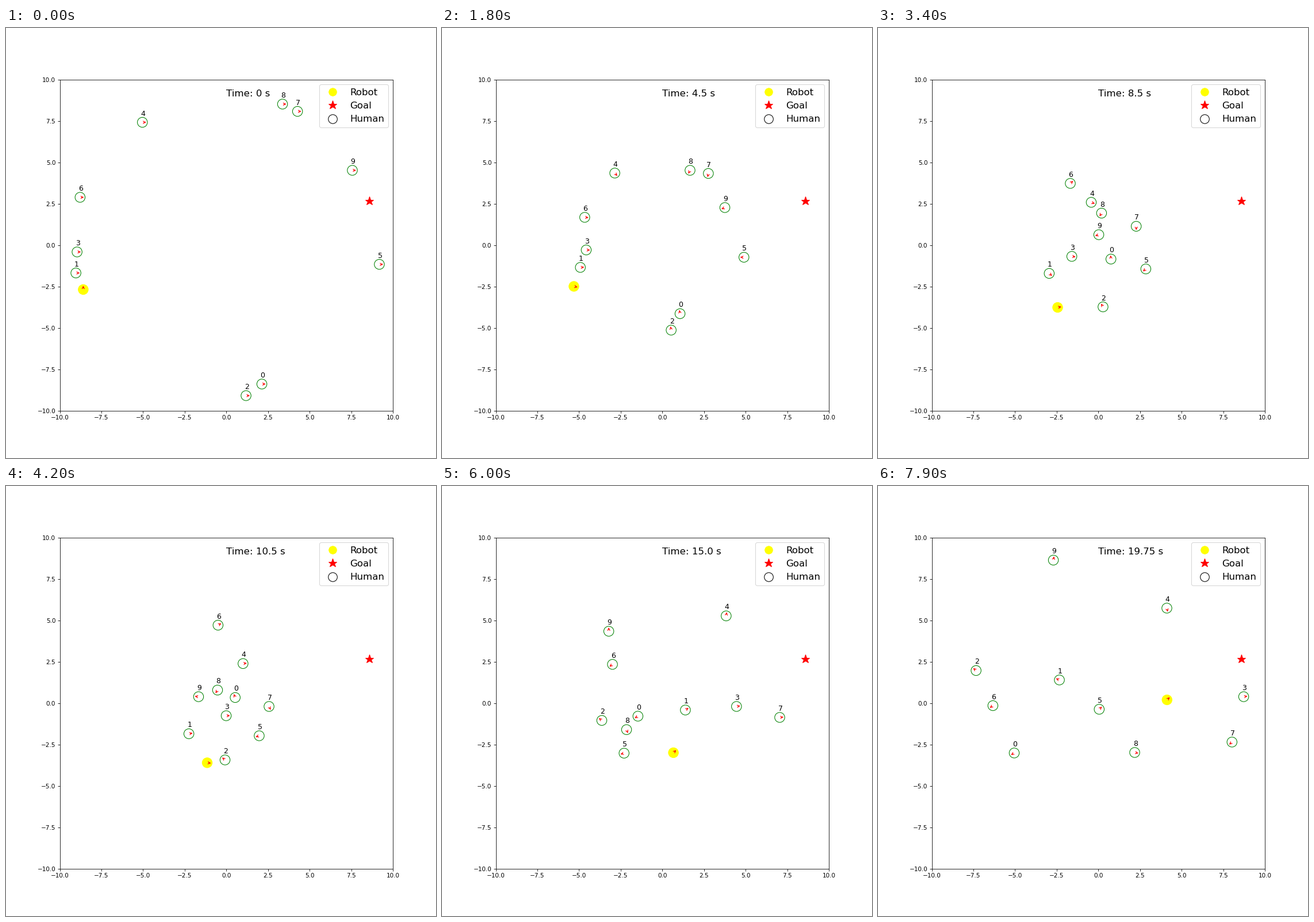
A matplotlib script for the animation above (8 s loop, 748 by 748 pixels).

```python
import numpy as np
import matplotlib.pyplot as plt
from matplotlib.animation import FuncAnimation
from matplotlib.lines import Line2D
from matplotlib.patches import ArrowStyle, Circle, FancyArrowPatch

STEPS, DT = 80, 0.25
RADIUS = 0.3
GOAL = (8.58, 2.67)

fig, ax = plt.subplots(figsize=(10, 10), dpi=74.8)
ticks = np.arange(-10, 10.1, 2.5)
ax.set(xlim=(-10, 10), ylim=(-10, 10), xticks=ticks, yticks=ticks)


def walk(start, *bends):
    """Spline from start (x, y) through a few bends (step, x, y)."""
    t, x, y = np.array([(0, *start), *bends], float).T
    pos = x + 1j * y
    leg = np.diff(pos) / np.diff(t)
    vel = np.empty_like(pos)
    vel[1:-1] = (pos[2:] - pos[:-2]) / (t[2:] - t[:-2])
    vel[0] = 1.5 * leg[0] - 0.5 * vel[1]
    vel[-1] = 1.5 * leg[-1] - 0.5 * vel[-2]

    def at(s):
        k = np.clip(np.searchsorted(t, s, side="right") - 1, 0, len(t) - 2)
        h = t[k + 1] - t[k]
        u = (s - t[k]) / h
        ease = u * u * (3 - 2 * u)
        return (pos[k] + ease * (pos[k + 1] - pos[k])
                + h * u * (1 - u) * ((1 - u) * vel[k] - u * vel[k + 1]))

    s = np.arange(STEPS, dtype=float)
    return at(s), np.angle(at(s) - at(s - 0.2))


class Agent:
    def __init__(self, path, start_angle=0, label="", **style):
        self.track, self.angle = path
        self.angle[0] = start_angle
        self.body = ax.add_patch(Circle((0, 0), RADIUS, **style))
        head = ArrowStyle("->", head_length=4, head_width=2)
        self.arrow = ax.add_patch(
            FancyArrowPatch((0, 0), (RADIUS, 0), color="red", arrowstyle=head))
        self.label = ax.text(0, 0, label, fontsize=12)

    def move(self, n):
        z = self.track[n]
        tip = z + RADIUS * np.exp(1j * self.angle[n])
        self.body.center = z.real, z.imag
        self.arrow.set_positions((z.real, z.imag), (tip.real, tip.imag))
        self.label.set_position((z.real - 0.1, z.imag + 0.4))


robot = walk((-8.59, -2.68), (18, -5.31, -2.49), (27, -3.71, -3.78),
             (42, -1.15, -3.6), (49, -0.8, -4.15), (54, -0.35, -3.9),
             (79, 4.12, 0.2))
humans = [
    walk((2.13, -8.39), (18, 1.06, -4.14), (42, 0.53, 0.34),
         (54, -0.5, -0.2), (79, -5.05, -3.01)),
    walk((-9.03, -1.68), (24, -3.84, -1.33), (42, -2.25, -1.85),
         (61, 1.5, -0.33), (67, 0.41, 0.2), (79, -2.34, 1.4)),
    walk((1.18, -9.09), (23, 0.37, -4.35), (42, -0.08, -3.43),
         (54, -2.46, -1.94), (79, -7.34, 1.97)),
    walk((-8.96, -0.41), (18, -4.57, -0.29), (42, -0.01, -0.76),
         (67, 6.18, 0.06), (79, 8.72, 0.39)),
    walk((-5.04, 7.42), (24, -2.03, 3.55), (42, 1, 2.39), (54, 3.41, 4.16),
         (67, 3.95, 6.66), (71, 3.7, 7.49), (79, 4.11, 5.74)),
    walk((9.18, -1.16), (22, 4.15, -0.77), (42, 1.97, -1.97),
         (54, -0.73, -2.42), (62, -2.45, -3), (79, 0.05, -0.37)),
    walk((-8.78, 2.89), (18, -4.66, 1.68), (27, -3.15, 2.54),
         (42, -0.5, 4.71), (54, -2.02, 3.13), (79, -6.33, -0.15)),
    walk((4.27, 8.08), (18, 2.76, 4.33), (42, 2.56, -0.2),
         (54, 5.47, -0.89), (70, 9.15, -0.88), (79, 8.02, -2.35)),
    walk((3.37, 8.52), (18, 1.66, 4.52), (42, -0.53, 0.79), (54, -1.56, -0.58),
         (60, -2.15, -1.6), (67, -0.74, -2.28), (79, 2.18, -2.98)),
    walk((7.56, 4.52), (18, 3.75, 2.27), (42, -1.67, 0.39),
         (54, -3.14, 3), (79, -2.7, 8.64)),
]
agents = [Agent(robot, np.pi / 2, color="yellow")]
agents += [Agent(path, label=str(i), fill=False, color="g")
           for i, path in enumerate(humans)]

goal = ax.plot(*GOAL, "r*", markersize=15)[0]
dot = dict(marker="o", color="w", markersize=15)
ax.legend([Line2D([], [], markerfacecolor="yellow", **dot), goal,
           Line2D([], [], markerfacecolor="w", markeredgecolor="k", **dot)],
          ["Robot", "Goal", "Human"], fontsize=16, loc="upper right")
clock = ax.text(0, 9, "", fontsize=16)


def update(n):
    for agent in agents:
        agent.move(n)
    clock.set_text(f"Time: {n * DT if n else 0} s")
    return []


anim = FuncAnimation(fig, update, frames=STEPS, interval=100,
                     repeat=True, repeat_delay=0)
plt.show()
```
